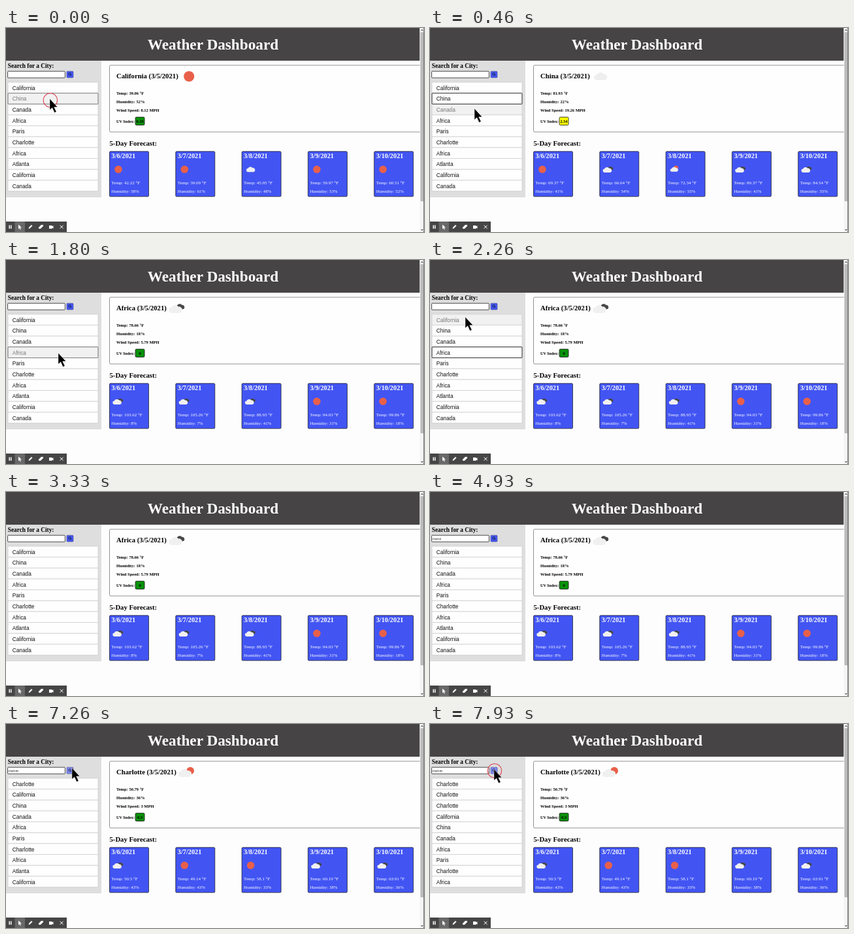
An HTML page for the animation above (8000 ms loop, 640 px wide and 312 px high).

```html
<!DOCTYPE html>
<html lang="en">
<head>
<meta charset="utf-8">
<title>Weather Dashboard</title>
<style>
html, body { margin: 0; width: 100%; height: 100%; overflow: hidden; background: #fdfdfd; }
svg { display: block; width: 100%; height: 100%; }
text { font-family: "Liberation Serif", "Times New Roman", serif; }
.b { font-weight: bold; }
.sans { font-family: "Liberation Sans", Arial, sans-serif; }
</style>
</head>
<body>
<svg viewBox="0 0 640 312">
  <defs>
    <path id="puff" d="M-8 7a4.5 4.5 0 0 1-.5-9a7 7 0 0 1 12-1.5a5.3 5.3 0 0 1 2 10.5z"/>
    <g id="sun"><circle r="8.1" fill="#e8604a"/></g>
    <g id="cloud"><use href="#puff" transform="translate(1.3 -.4) scale(.88)" fill="#eee"/></g>
    <g id="broken">
      <use href="#puff" transform="translate(4.8 -3) scale(.62)" fill="#484848"/>
      <use href="#puff" transform="translate(-1.5 .6) scale(.9)" fill="#f0f0f0"/>
    </g>
    <g id="few">
      <circle cx="5" cy="-2.5" r="5.8" fill="#e8604a"/>
      <use href="#puff" transform="translate(-2 .6) scale(.9)" fill="#f0f0f0"/>
    </g>
    <g id="rain">
      <circle cx="3" cy="-4" r="4.8" fill="#e8604a"/>
      <use href="#puff" transform="translate(0 -.5) scale(.8)" fill="#f0f0f0"/>
    </g>
  </defs>

  <rect width="633.6" height="50" fill="#464444"/>
  <text class="b" x="317" y="33" font-size="23.25" fill="#fff" text-anchor="middle">Weather Dashboard</text>

  <rect y="50" width="146" height="209" fill="#dedede"/>
  <text class="b" x="2.8" y="61" font-size="9.3">Search for a City:</text>
  <rect x="2.6" y="66.2" width="87.800" height="10" rx="1" fill="#fff" stroke="#222" stroke-width=".8"/>
  <g id="search"></g>
  <g id="list"></g>

  <path d="M634 57H160q-1.5 0-1.5 1.5V157.500q0 1.500 1.500 1.500H634" fill="#fefefe" stroke="#777" stroke-width=".8"/>
  <g id="now"></g>
  <text class="b" x="158.500" y="179.500" font-size="10.7">5-Day Forecast:</text>
  <g id="days"></g>

  <rect x="633.6" width="6.400" height="312" fill="#f4f4f4"/>
  <rect x="634.500" y="6.500" width="4.800" height="258.500" fill="#bcbcbc"/>
  <path d="M635 4l2-2 2 2zM635 308l2 2 2-2z" fill="#555"/>
  <rect x="639.300" width=".7" height="312" fill="#555"/>

  <rect y="296" width="93" height="16" fill="#454545"/>
  <rect x="13.500" y="296" width="15.500" height="16" fill="#686868"/>
  <g fill="#fff">
    <path d="M4.500 301.500h1.500v5.500h-1.500zM7 301.500h1.500v5.500H7z"/>
    <path d="M19 300.500v7l1.700-1.500 1.200 2.500 1-.5-1.200-2.400h2.300z"/>
    <path d="M34.500 307l.5-2 4-4 1.500 1.500-4 4z"/>
    <path d="M50 305l4-4h3v2l-4 4h-3z"/>
    <path d="M66 302h4.500v1.500l2-1.200v4.400l-2-1.200v1.500H66z"/>
  </g>
  <path d="M82.700 301.700l5 5m0-5l-5 5" stroke="#fff"/>
  <g id="pointer"></g>
</svg>

<script>
const LOOP = 8000, STEP = 1000 / 15;

const city = (name, temp, hum, wind, uv, icon, icons, temps, hums) =>
  ({ name, temp, hum, wind, uv, icon, icons, temps, hums });
const ICONS = { s: 'sun', c: 'cloud', b: 'broken', f: 'few', r: 'rain' };

const california = city('California', 39.06, 52, 8.12, '0.19', 's', 'sscss',
  ['42.22', '39.09', '45.95', '59.97', '60.51'], [58, 61, 48, 53, 52]);
const china = city('China', 81.93, 22, 19.26, '2.54', 'c', 'sbrbb',
  ['69.37', '66.04', '72.34', '80.37', '84.54'], [41, 54, 55, 41, 35]);
const canada = city('Canada', 28.74, 61, 9.37, '0.42', 'b', 'bbsbb',
  ['27.16', '25.81', '30.42', '34.27', '36.05'], [72, 68, 64, 66, 70]);
const africa = city('Africa', 78.66, 18, 5.79, '0', 'b', 'bbbss',
  ['103.62', '105.26', '88.93', '94.03', '99.86'], [8, 7, 41, 31, 18]);
const charlotte = city('Charlotte', 50.79, 36, 3, '0.3', 'f', 'bssbb',
  ['50.5', '49.14', '58.1', '60.19', '63.91'], [43, 43, 33, 38, 36]);

const HISTORY = ['California', 'China', 'Canada', 'Africa', 'Paris',
  'Charlotte', 'Africa', 'Atlanta', 'California', 'Canada'];

// Timeline: [start, value]
const LOADS = [[0, california], [200, china], [1330, canada], [1800, africa], [6930, charlotte]];
const FOCUS = [[0, 1], [930, 2], [1600, 3], [2860, -1]];
const CLICKS = [-130, 930, 1600, 2860, 6800, 7330, 7800];
const PUSHES = [6930, 7400, 7860];
const KEYS = [3800, 4130, 4400, 4530, 4660, 4800, 4930, 5060, 5200];
const PATHS = [
  [[0, 67, 108], [60, 67, 108], [460, 68, 123], [1000, 68, 123], [1260, 81, 143],
   [1460, 80, 142], [1860, 80, 142], [2260, 54, 87], [2400, 49, 75], [2660, 46, 71], [3320, 46, 70]],
  [[5990, 60, 72], [6260, 118, 78], [6600, 102, 70], [6800, 101, 68],
   [7260, 101, 67], [7600, 98, 69], [8000, 98, 69]]
];

const $ = id => document.getElementById(id);
const at = (track, t) => track.filter(k => k[0] <= t).pop()[1];
const count = (times, t) => times.filter(k => k <= t).length;

const cache = {};
function put(id, html) {
  if (cache[id] === html) return false;
  $(id).innerHTML = cache[id] = html;
  return true;
}

const text = (x, y, size, s, attrs = '') =>
  `<text x="${x}" y="${y}" font-size="${size}" ${attrs}>${s}</text>`;
const rect = (x, y, w, h, attrs) =>
  `<rect x="${x}" y="${y}" width="${w}" height="${h}" ${attrs}/>`;
const icon = (kind, x, y, scale) =>
  `<use href="#${ICONS[kind]}" transform="translate(${x} ${y}) scale(${scale})"/>`;

function pointerAt(t) {
  const path = PATHS.find(p => t >= p[0][0] && t < p[p.length - 1][0]);
  if (!path) return null;
  const i = path.findIndex(k => k[0] > t);
  const [t0, x0, y0] = path[i - 1], [t1, x1, y1] = path[i];
  const u = (t - t0) / (t1 - t0), e = u * u * (3 - 2 * u);
  return [x0 + (x1 - x0) * e, y0 + (y1 - y0) * e];
}

function drawCity(c) {
  const bold = 'class="b"';
  const uvFill = c.uv >= 2 ? '#ff0' : '#0a910a';
  const changed = put('now',
    text(169, 77.4, 10.7, `${c.name} (3/5/2021)`, bold) +
    text(169, 101.6, 6.5, `Temp: ${c.temp} °F`, bold) +
    text(169, 115, 6.5, `Humidity: ${c.hum}%`, bold) +
    text(169, 128.4, 6.5, `Wind Speed: ${c.wind} MPH`, bold) +
    text(169, 144.7, 6.3, 'UV Index:', bold) +
    rect(198.1, 136.3, 13.9, 12.2, `rx="1.5" fill="${uvFill}" stroke="#111" stroke-width=".8"`) +
    text(205, 144.7, 6.3, c.uv, bold + ' text-anchor="middle"'));
  if (!changed) return;

  const end = 169 + $('now').firstChild.getComputedTextLength();
  $('now').insertAdjacentHTML('beforeend', icon(c.icon, end + 16.5, 74, 1));

  put('days', c.temps.map((temp, i) => {
    const x = 158.5 + i * 101.3, kind = c.icons[i];
    return rect(x, 188.8, 60, 69, 'rx="1.5" fill="#4255f3" stroke="#111" stroke-width=".7"') +
      '<g fill="#fff">' +
      text(x + 3, 199.3, 10.3, `3/${6 + i}/2021`, bold) +
      text(x + 3, 238.7, 7, `Temp: ${temp} °F`) +
      text(x + 3, 252.3, 6.8, `Humidity: ${c.hums[i]}%`) + '</g>' +
      icon(kind, x + 13.5, 216.3, kind === 's' ? 0.71 : 0.67);
  }).join(''));
}

function drawList(t, p) {
  const pushed = PUSHES.filter(k => k <= t).map(() => 'Charlotte');
  const names = [...pushed, ...HISTORY].slice(0, 10);
  const focus = at(FOCUS, t), pitch = 16.65;
  const hover = p && p[0] > 3 && p[0] < 141 ? Math.floor((p[1] - 83) / pitch) : -1;
  const rows = names.map((name, i) => {
    const y = 83 + i * pitch, over = i === hover;
    return rect(3, y, 138, pitch, `fill="${over ? '#f1f1f1' : '#fefefe'}" stroke="#d2d2d2" stroke-width=".9"`) +
      text(9.7, y + 11.7, 8.3, name, `class="sans" fill="${over ? '#777' : '#111'}"`);
  });
  if (focus >= 0)
    rows.push(rect(3, 83 + focus * pitch, 138, pitch,
      `rx="1" fill="none" stroke="${focus === hover ? '#777' : '#222'}" stroke-width=".9"`));
  put('list', rows.join(''));
}

function drawSearch(t, p) {
  const n = count(KEYS, t);
  const over = p && p[0] > 92 && p[0] < 104 && p[1] > 65 && p[1] < 77;
  const caret = n && t < 6800 && (t < 5720 || t >= 6220);
  put('search',
    text(3.5, 73, 4.1, 'charlotte'.slice(0, n) + (caret ? '<tspan dx="-.3">|</tspan>' : ''), 'class="sans"') +
    rect(93, 66.2, 10, 9.8, `rx="1" fill="${over ? '#7c88f0' : '#4255f3'}" stroke="#4a4f96" stroke-width=".6"`) +
    '<g fill="none" stroke="#111" stroke-width=".8"><circle cx="97.6" cy="70.500" r="1.700"/><path d="M98.800 71.700l1.500 1.500"/></g>');
}

function drawPointer(t, p) {
  if (!p) return put('pointer', '');
  const [x, y] = p;
  const age = CLICKS.map(c => t - c).find(a => a >= 0 && a < 200);
  const ring = age === undefined ? '' :
    `<circle cx=".9" cy="2.500" r="${10.7 * Math.min(1, (age + 20) / 140)}" fill="none" stroke="#dc4a5a" stroke-width="1.100"/>`;
  put('pointer', `<g transform="translate(${x} ${y})">${ring}
    <path d="M0 .3V17.200l3.800-3.300 3.400 7.500 2.900-1.300-3.400-7.200h5.100z" stroke="#fff" stroke-width=".4"/></g>`);
}

function frame(now) {
  const t = Math.floor((now % LOOP + 7) / STEP) * STEP % LOOP;
  const p = pointerAt(t);
  drawCity(at(LOADS, t));
  drawList(t, p);
  drawSearch(t, p);
  drawPointer(t, p);
  requestAnimationFrame(frame);
}
frame(0);
</script>
</body>
</html>
```
